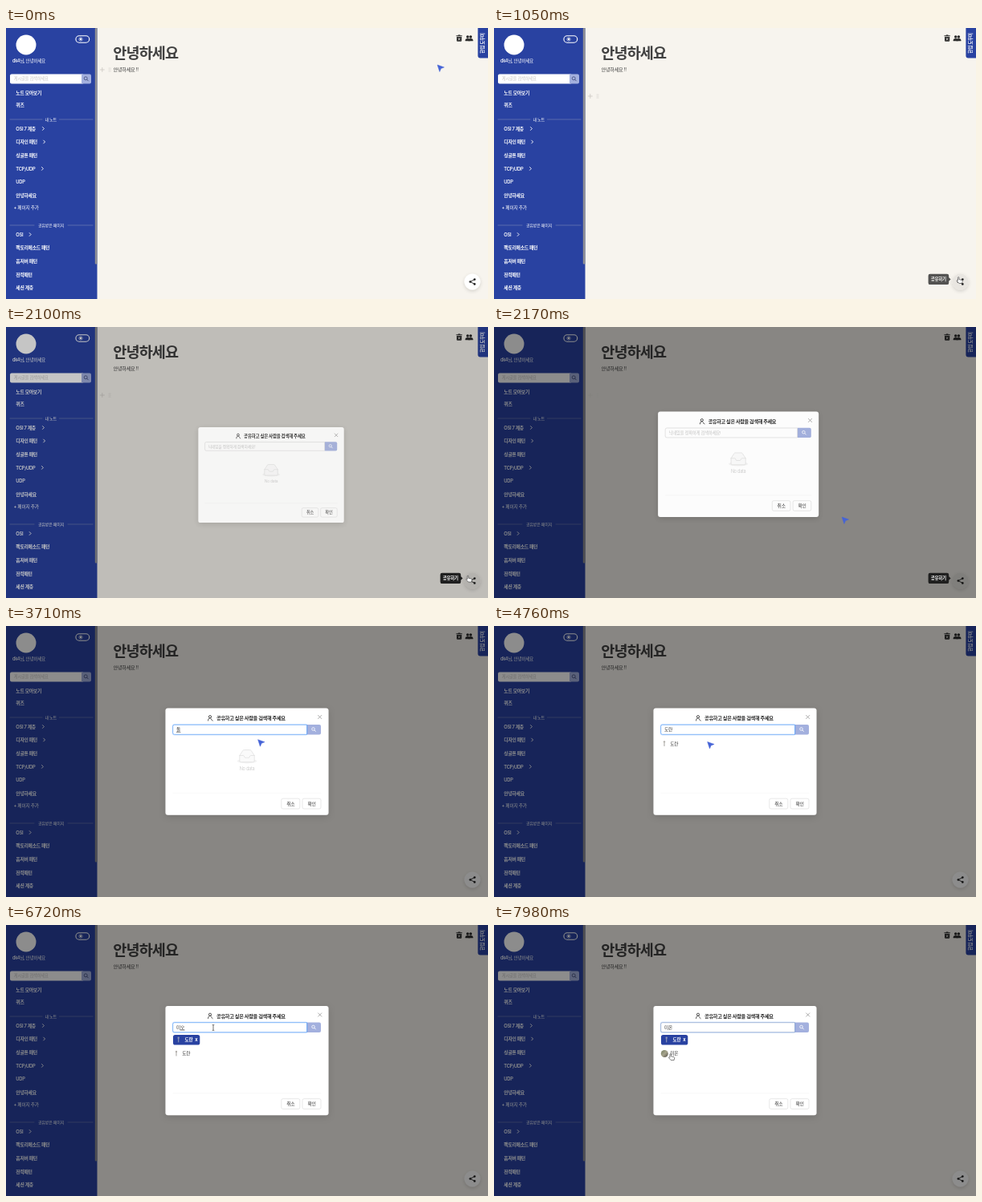
Recreate the animation shown at these times as an HTML page. Size 600 by 338 pixels, loop 8000 ms.

```html
<!DOCTYPE html>
<html lang="ko">
<head>
<meta charset="utf-8">
<title>Share a note</title>
<style>
html, body { margin: 0; width: 100%; height: 100%; overflow: hidden; background: #f7f4ee; }
svg { display: block; width: 100vw; height: 100vh; }
text { font-family: Inter, "Noto Sans CJK KR", "Noto Sans CJK", sans-serif; letter-spacing: -.05em; white-space: pre; }
</style>
</head>
<body>
<svg id="stage" viewBox="0 0 600 338" xmlns="http://www.w3.org/2000/svg"></svg>
<script>
const LOOP = 8000;
const BLUE = '#2942a1', PALE = '#a3b0de', INK = '#2b2b2b';
const NAME1 = '도란', NAME2 = '미온';
const SHARE = { x: 580.5, y: 316.5 };

// Text placed by its vertical centre
const txt = (x, y, size, str, fill = '#fff', weight = 400, more = '') =>
  `<text x="${x}" y="${(y + size * .37).toFixed(2)}" font-size="${size}" fill="${fill}" font-weight="${weight}" ${more}>${str}</text>`;
const rect = (x, y, w, h, r, fill, more = '') =>
  `<rect x="${x}" y="${y}" width="${w}" height="${h}" rx="${r}" fill="${fill}" ${more}/>`;
const line = (d, stroke, width = .8, more = '') =>
  `<path d="${d}" fill="none" stroke="${stroke}" stroke-width="${width}" stroke-linecap="round" stroke-linejoin="round" ${more}/>`;
const circle = (x, y, r, fill, more = '') => `<circle cx="${x}" cy="${y}" r="${r}" fill="${fill}" ${more}/>`;
const lens = (x, y, r, color) =>
  circle(x - .5, y - .5, r, 'none', `stroke="${color}" stroke-width=".8"`) +
  line(`M${x - .5 + r * .72} ${y - .5 + r * .72}l1.6 1.6`, color, .9);

function sidebar() {
  const item = (y, label, arrow) => txt(12.3, y, 5.85, label, '#fff', 600) +
    (arrow ? line(`M${arrow - 1} ${y - 1.9}l1.9 1.9l-1.9 1.9`, '#fff', .9) : '');
  const divider = (y, label, from, to) =>
    line(`M5 ${y}H${from}M${to} ${y}H108`, '#bfc3c8', .5, 'opacity=".65"') +
    txt((from + to) / 2, y, 5.1, label, '#fff', 500, 'text-anchor="middle"');
  let rays = '';
  for (let i = 0; i < 8; i++) {
    const a = i * Math.PI / 4, c = Math.cos(a), s = Math.sin(a);
    rays += `M${93 + c * 2} ${14 + s * 2}L${93 + c * 2.6} ${14 + s * 2.6}`;
  }
  return rect(0, 0, 113.5, 338, 0, BLUE) +
    rect(110.8, 0, 2.7, 294.5, 1, '#8f8f92') +
    circle(25, 21, 12.5, '#fff') +
    rect(86.9, 9.8, 16.8, 8.4, 4.2, 'none', 'stroke="#fff" stroke-width="1.1"') +
    circle(93, 14, 1.4, '#fff') + line(rays, '#fff', .6) +
    txt(8, 41, 5.6, 'dk4님, 안녕하세요', '#fff', 500) +
    rect(5, 57.5, 92, 12, 2, '#fff') +
    `<path d="M94 57.5h10a2 2 0 0 1 2 2v8a2 2 0 0 1-2 2h-10z" fill="${PALE}"/>` +
    lens(99.7, 63.3, 2, '#3f4a78') +
    txt(9.8, 63.4, 5.3, '게시글을 검색하세요', '#c5c3c3') +
    item(80.5, '노트 모아보기') + item(96, '퀴즈') +
    divider(114, '내 노트', 45, 66.5) +
    item(125.5, 'OSI 7 계층', 46.5) + item(142, '디자인 패턴', 47.7) +
    item(158.8, '싱글톤 패턴') + item(175.4, 'TCP/UDP', 45.5) +
    item(192, 'UDP') + item(208.7, '안녕하세요') +
    txt(9.5, 223.6, 5.8, '+ 페이지 추가', '#fff', 500) +
    divider(246, '공유받은 페이지', 35, 77) +
    item(257.5, 'OSI', 30.2) + item(274, '팩토리메소드 패턴') +
    item(290.6, '옵저버 패턴') + item(307.4, '전략패턴') + item(324, '세션 계층');
}

function page() {
  const person = (x, y) => circle(x, y - 2, 1.75, INK) +
    `<path d="M${x - 3} ${y + 3.2}v-.9c0-3.2 6-3.2 6 0v.9z" fill="${INK}"/>`;
  let dots = '';
  for (let i = 0; i < 6; i++) dots += circle(128.1 + i % 2 * 1.8, -1.9 + (i >> 1) * 1.9, .5, '#cbc7c2');
  return rect(0, 0, 600, 338, 0, '#f7f4ee') +
    txt(133.3, 31, 18.6, '안녕하세요', '#414141', 600) +
    txt(133.5, 52, 6.2, '안녕하세요 !!', '#414141') +
    `<g id="handle">${line('M117.3 0h5M119.8-2.5v5', '#cbc7c2', .8)}${dots}</g>` +
    `<path d="M561 10.9h6.2v4.9q0 1-1 1h-4.2q-1 0-1-1zM560.4 9.3h2l.7-.8h2l.7.8h2v1h-7.4z" fill="${INK}"/>` +
    line('M563 12.5l2.2 2.5m0-2.5l-2.2 2.5', '#f7f4ee', .7) +
    person(574.7, 13) + person(578.4, 13) +
    `<path d="M600 0v37.6h-9.6a3 3 0 0 1-3-3V0z" fill="${BLUE}"/>` +
    `<g transform="translate(593.4 19) rotate(-90)">${txt(0, 0, 5.6, '한입 도우미', '#fff', 600, 'text-anchor="middle"')}</g>` +
    circle(SHARE.x, SHARE.y, 10, '#fff', 'id="share" filter="url(#soft)"') +
    line('M583.3 313.6L577.9 316.5L583.3 319.4', '#222', .9) +
    circle(583.3, 313.6, 1.35, '#222') + circle(577.9, 316.5, 1.35, '#222') + circle(583.3, 319.4, 1.35, '#222');
}

function figure(x, y, color) {
  return circle(x, y - 2.2, 1.2, color) + line(`M${x} ${y - .6}v3.4`, color, 1.2);
}

function dialog() {
  const button = (x, label) => rect(x, 215.2, 23, 12.8, 2, '#fff', 'stroke="#d9d9d9" stroke-width=".6"') +
    txt(x + 11.5, 221.6, 5.9, label, '#333', 400, 'text-anchor="middle"');
  return rect(198.5, 102.5, 203, 133.3, 3, '#fff', 'id="box" filter="url(#deep)"') +
    `<g id="top">` +
    circle(254, 113.2, 1.6, 'none', 'stroke="#222" stroke-width=".8"') +
    line('M251.6 118c0-3.6 3-3.4 3.6-3M255.4 116.4l1.8 1.7', '#222', .8) +
    txt(262, 115, 6.2, '공유하고 싶은 사람을 검색해 주세요', '#222', 600) +
    line('M388.6 111.4l4.2 4.2m0-4.2l-4.2 4.2', '#888', .7) +
    `<path d="M374.5 123h15.5a2 2 0 0 1 2 2v8.5a2 2 0 0 1-2 2h-15.5z" fill="${PALE}"/>` +
    lens(383, 129, 1.8, '#fff') +
    rect(207.3, 122.6, 167.7, 13.3, 2.4, 'none', 'id="glow" stroke="#1677ff" stroke-opacity=".15" stroke-width="1.2"') +
    `<path id="field" d="M374.5 123.2h-164.8a2 2 0 0 0-2 2v8.1a2 2 0 0 0 2 2h164.8z" fill="#fff" stroke-width=".7"/>` +
    rect(212, 125.6, 10.2, 7.2, 0, '#b4d2fb', 'id="mark"') +
    txt(212, 129.2, 5.5, '닉네임을 정확하게 검색하세요!', '#c4c4c4', 400, 'id="hint"') +
    txt(212, 129.2, 5.8, '', '#333', 400, 'id="typed"') +
    line('', '#333', .5, 'id="under"') + line('', '#222', .6, 'id="caret"') + `</g>` +
    `<g id="empty"><ellipse cx="300" cy="168.6" rx="12.3" ry="2.8" fill="#f3f3f3"/>` +
    `<path d="M290.8 161.5l3.9-6q.6-.9 1.6-.9h7.4q1 0 1.6.9l3.9 6v6.6q0 1.6-1.6 1.6h-15.2q-1.6 0-1.6-1.6z" fill="#fafafa" stroke="#d9d9d9" stroke-width=".6"/>` +
    line('M290.8 161.5h4.8c1.2 0 .9 2.8 2.2 2.8h4.4c1.3 0 1-2.8 2.2-2.8h4.8', '#d9d9d9', .6) +
    txt(300, 178, 5.6, 'No data', '#cfcfcf', 400, 'text-anchor="middle"') + `</g>` +
    `<g id="chip">` + rect(208, 137, 33.3, 12.6, 2.6, BLUE) + figure(214.7, 143, '#8d97b8') +
    txt(222.6, 143.3, 5.6, NAME1, '#fff', 600) + txt(235.2, 143.2, 5.8, 'x', '#fff', 700) + `</g>` +
    `<g id="row"><g id="pic1">${figure(212, 160.2, '#b3b0ac')}</g>` +
    `<g id="pic2">${circle(212.3, 160.5, 4.5, 'url(#photo)')}</g>` +
    txt(219.3, 160.2, 5.7, '', '#333', 400, 'id="found"') + `</g>` +
    `<g id="bottom">${line('M208 208.4H392', '#f3f3f3', .5)}${button(342.8, '취소')}${button(369, '확인')}</g>`;
}

const stage = document.getElementById('stage');
stage.innerHTML = `<defs>
  <filter id="soft" x="-50%" y="-50%" width="200%" height="200%"><feDropShadow dx="0" dy="1.6" stdDeviation="2.2" flood-opacity=".16"/></filter>
  <filter id="deep" x="-20%" y="-20%" width="140%" height="140%"><feDropShadow dx="0" dy="2" stdDeviation="4" flood-opacity=".15"/></filter>
  <linearGradient id="photo" x1="0" y1="0" x2="1" y2="1"><stop offset="0" stop-color="#6f7a5c"/><stop offset=".5" stop-color="#a8a58e"/><stop offset="1" stop-color="#4d4a42"/></linearGradient>
  </defs>${page()}${sidebar()}
  <rect id="mask" width="600" height="338"/>
  <g id="tip">${rect(540.6, 306.7, 25.6, 13.4, 2.2, '#1f1f1f')}<path d="M566 311l2.6 2.4l-2.6 2.4z" fill="#1f1f1f"/>
  ${txt(553.3, 313.4, 5.5, '공유하기', '#fff', 600, 'text-anchor="middle"')}</g>
  <g id="modal">${dialog()}</g>
  <g id="pointer">
    <path id="arrow" d="M0 0L8.4 3L4.5 4.6L2.8 8.5Z" fill="#4563d6" stroke="#4563d6" stroke-width=".5" stroke-linejoin="round"/>
    <path id="hand" d="M-.7.7C-.7-.3.8-.3.8.7V3L4 3.7C4.9 3.9 5.1 4.5 5 5.2L4.5 7.8H.6L-2 4.9C-2.4 4.3-1.6 3.7-1.1 4.1L-.7 4.5Z" fill="#fff" stroke="#333" stroke-width=".6" stroke-linejoin="round"/>
    <path id="beam" d="M-1.3-3.6Q0-3.6 0-2.8Q0-3.6 1.3-3.6M0-2.8V2.8M-1.3 3.6Q0 3.6 0 2.8Q0 3.6 1.3 3.6" fill="none" stroke="#333" stroke-width=".7"/>
  </g>`;

const el = {};
stage.querySelectorAll('[id]').forEach(e => el[e.id] = e);
const set = (id, attrs) => { for (const k in attrs) el[id].setAttribute(k, attrs[k]); };
const show = (id, on) => set(id, { opacity: +on });
const ramp = (t, a, b) => Math.min(1, Math.max(0, (t - a) / (b - a)));

const smooth = u => u * u * (3 - 2 * u), out = u => 1 - (1 - u) ** 3, linear = u => u;
// time, x, y, easing used to arrive
const path = [
  [0, 537, 46], [840, 579, 303, smooth], [1120, 578, 312, smooth], [1260, 578, 312, linear],
  [1650, 580, 314, smooth], [2030, 577, 311.3, smooth], [2100, 577, 311.3, linear],
  [2170, 434.3, 238, linear], [2500, 302, 129, out], [2600, 302, 129, linear],
  [2870, 313.6, 141.7, smooth], [4560, 313.6, 141.7, linear], [4950, 222, 147, smooth],
  [5080, 222, 147, linear], [5450, 301.2, 173.4, smooth], [5470, 301.2, 173.4, linear],
  [5820, 262, 127.5, smooth], [6020, 258, 128, smooth], [7070, 258, 128, linear],
  [7840, 220, 160.5, smooth], [8000, 219.6, 160.8, smooth]
];
const typing = [
  [3640, '도'], [3710, '돌'], [3850, '도라'], [3920, NAME1],
  [6440, 'ㅁ'], [6580, '미'], [6650, '밍'], [6720, '미오'], [6790, NAME2]
];
const OPEN = 2030, FOUND1 = 4200, PICK = 5040, FOUND2 = 7070;

function pointerAt(t) {
  const i = Math.max(1, path.findIndex(k => k[0] >= t));
  const a = path[i - 1], b = path[i], u = b[3](ramp(t, a[0], b[0]));
  return { x: a[1] + (b[1] - a[1]) * u, y: a[2] + (b[2] - a[2]) * u };
}

function render(t) {
  const p = pointerAt(t), picked = t >= PICK, opened = t > OPEN;
  const rowY = picked ? 160.5 : 147;
  const onShare = t < 2150 && Math.hypot(p.x - SHARE.x, p.y - SHARE.y) < 11;
  const onRow = t > FOUND1 && p.x < 236 && Math.abs(p.y - rowY) < 6;
  const onField = t > 2200 && p.x < 374 && p.y > 121 && p.y < 135;
  set('pointer', { transform: `translate(${p.x} ${p.y})` });
  show('hand', onShare || onRow);
  show('beam', onField);
  show('arrow', !(onShare || onRow || onField));

  set('handle', { transform: `translate(0 ${p.y < 68 && t < 840 ? 52 : 85})`, opacity: 1 - ramp(t, 2080, 2200) });
  const hover = t > 860 && t < 2200;
  set('share', { fill: hover ? '#e9e6e1' : '#fff' });
  set('tip', { opacity: ramp(t, 960, 1080) * (1 - ramp(t, 2200, 2300)) });

  // The dialog grows out of the clicked button
  const grow = opened ? 1 - Math.exp((OPEN - t) / 35.3) : 0, s = .2 + .8 * grow;
  set('mask', { opacity: .45 * ramp(t, OPEN, OPEN + 140) });
  set('modal', { opacity: grow, transform: `translate(${SHARE.x * (1 - s)} ${313 * (1 - s)}) scale(${s})` });

  const d = picked ? 1.5 : 0;
  set('box', { y: 102.5 - d, height: 133.3 + 2 * d });
  set('top', { transform: `translate(0 ${-d})` });
  set('bottom', { transform: `translate(0 ${d})` });

  const focus = t > 2560 && t < PICK || t > 5840;
  set('field', { stroke: focus ? (t > 7840 ? '#8098c6' : '#4e97f5') : '#d9d9d9' });
  show('glow', focus);

  const typed = typing.filter(k => k[0] <= t).pop();
  const word = typed ? typed[1] : '', end = 212.4 + word.length * 5.05;
  el.typed.textContent = word;
  show('hint', !word);
  const marked = t > 5960 && t < 6440;
  show('mark', marked);
  const composing = t >= 3640 && t < FOUND1 || t >= 6440 && t < FOUND2;
  set('under', { d: `M${end - 5.2} 132.6H${end - .3}`, opacity: +composing });
  set('caret', { d: `M${end + .5} 126.3v5.8` });
  show('caret', focus && !marked && !composing && (t < 3080 || t >= 3430 && t < 3640));

  show('chip', picked);
  set('empty', { opacity: 1 - ramp(t, FOUND1, 4340) });
  set('row', { opacity: ramp(t, FOUND1, 4410), transform: `translate(0 ${rowY - 160.5})` });
  const second = t >= FOUND2;
  show('pic1', !second);
  show('pic2', second);
  el.found.textContent = second ? NAME2 : NAME1;
}

const start = performance.now();
function tick() {
  render((performance.now() - start) % LOOP);
  requestAnimationFrame(tick);
}
tick();
</script>
</body>
</html>
```
